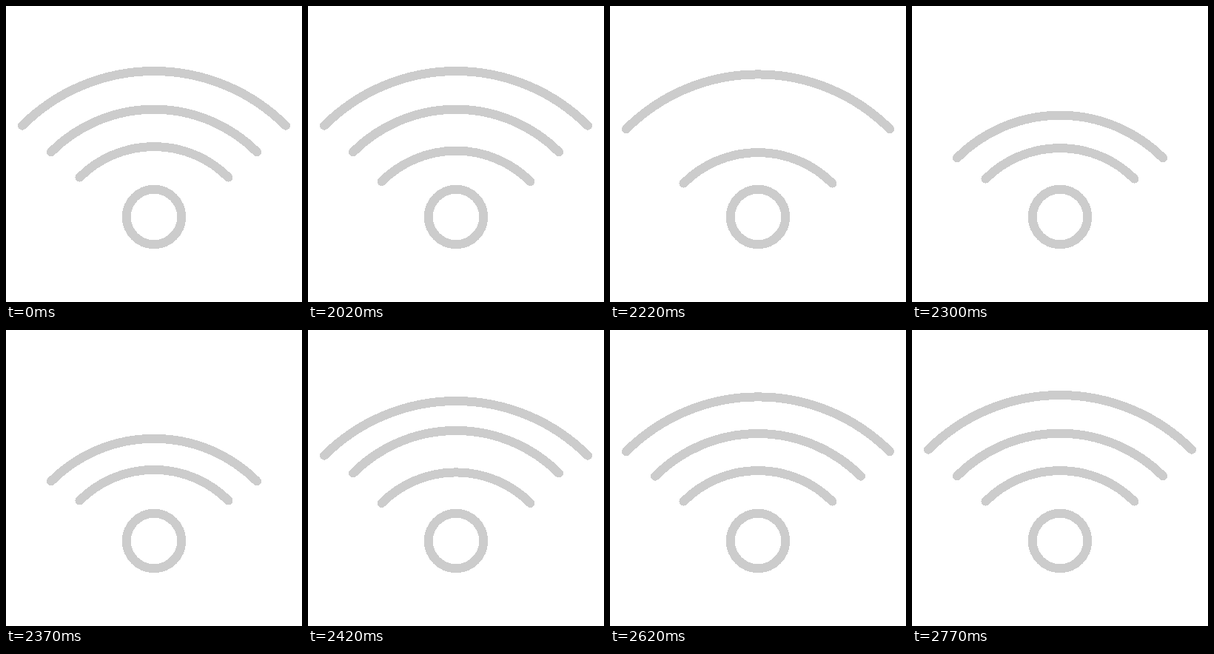
An HTML page for the animation above (2820 ms loop, 400 by 400 pixels).

```html
<!DOCTYPE html>
<html lang="en">
<head>
<meta charset="utf-8">
<title>Wireless signal</title>
<style>
  html, body { margin: 0; width: 100%; height: 100%; overflow: hidden; background: #fff; }
  svg { display: block; width: 100%; height: 100%; }
</style>
</head>
<body>
<svg viewBox="0 0 400 400" fill="none" stroke="#ccc" stroke-width="12" stroke-linecap="round" shape-rendering="crispEdges">
  <circle cx="200" cy="285" r="37.2"/>
</svg>
<script>
const LOOP = 2820;
const HIDE_FROM = 60, HIDE_TO = 190;
const svg = document.querySelector('svg');

// Time since the arc's start (ms) and vertical offset (px).
const bounce = [[0, 0], [30, 8], [265, 8], [333, -4], [410, 2.4], [565, 0]];

const arcs = [
  { half: 100.5, top: 190, start: 2002 },
  { half: 139, top: 139.7, start: 2094 },
  { half: 178, top: 88, start: 2205 }
].map(makeArc);

// Each arc spans a quarter circle.
function makeArc({ half, top, start }) {
  const radius = half * Math.SQRT2;
  const y = top + radius - half;
  const path = document.createElementNS('http://www.w3.org/2000/svg', 'path');
  path.setAttribute('d', `M${200 - half} ${y}A${radius} ${radius} 0 0 1 ${200 + half} ${y}`);
  svg.append(path);
  return { path, start };
}

function offsetAt(t) {
  if (t <= 0) return 0;
  const i = bounce.findIndex(([time]) => time > t);
  if (i < 0) return 0;
  const [t0, y0] = bounce[i - 1];
  const [t1, y1] = bounce[i];
  const eased = (1 - Math.cos(Math.PI * (t - t0) / (t1 - t0))) / 2;
  return y0 + (y1 - y0) * eased;
}

function render(time) {
  for (const { path, start } of arcs) {
    const t = time - start;
    const hidden = t >= HIDE_FROM && t < HIDE_TO;
    path.setAttribute('visibility', hidden ? 'hidden' : 'visible');
    path.setAttribute('transform', `translate(0 ${offsetAt(t).toFixed(2)})`);
  }
}

const origin = performance.now();
function tick() {
  render((performance.now() - origin) % LOOP);
  requestAnimationFrame(tick);
}
tick();
</script>
</body>
</html>
```
